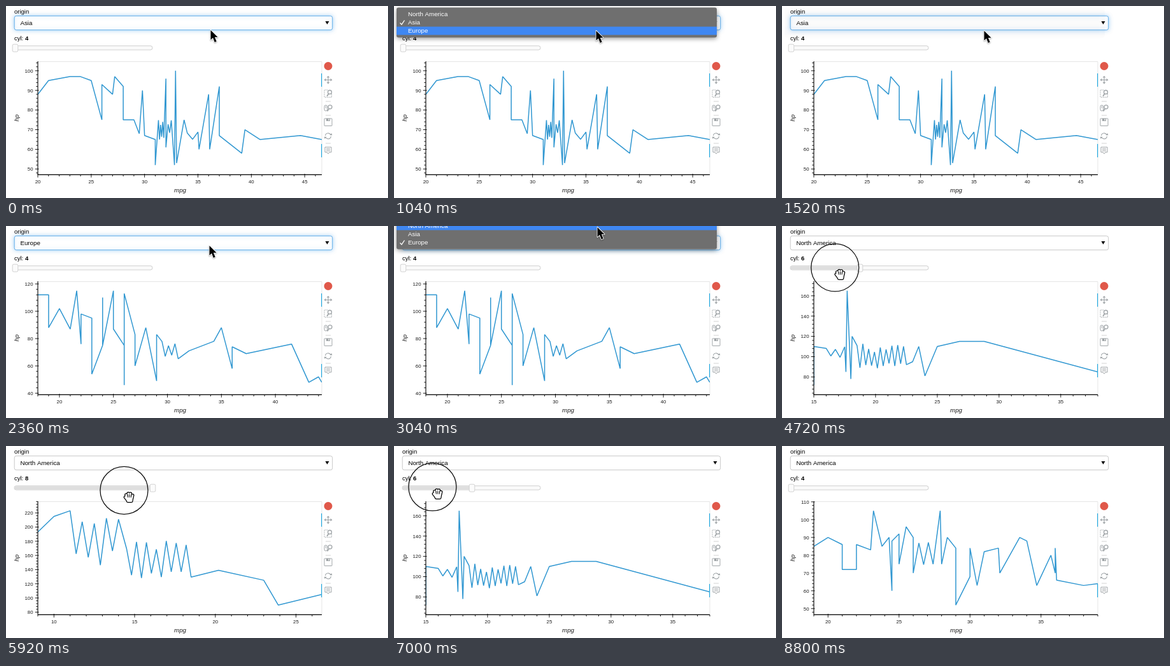
Recreate the animation shown at these times as an HTML page with a canvas. Size 600 by 302 pixels, loop 8.84 s.

```html
<!DOCTYPE html>
<html lang="en">
<head>
<meta charset="utf-8">
<title>Chart with controls</title>
<style>
html, body { margin: 0; width: 100%; height: 100%; overflow: hidden; background: #fff; }
canvas { display: block; width: 600px; height: 302px; }
</style>
</head>
<body>
<canvas id="stage"></canvas>
<script>
const W = 600, H = 302, LOOP = 8840;
const canvas = document.getElementById('stage');
const g = canvas.getContext('2d');
const ratio = window.devicePixelRatio || 1;
canvas.width = W * ratio;
canvas.height = H * ratio;

const FONT = '"Liberation Sans", Arial, sans-serif';
const BLUE = '#3097d1', GREY = '#a1a6a9', INK = '#1c1c1c';
const REGIONS = ['North America', 'Asia', 'Europe'];
const frame = { l: 50, r: 496, t: 87, b: 265 };

const clamp = v => Math.max(0, Math.min(1, v));
const ease = u => u * u * (3 - 2 * u);
const noise = v => Math.abs(Math.sin(v * 127.1) * 43758.5) % 1;

// Points that swing between lo and hi, each falling a little short at random
function zigzag(x0, x1, n, lo, hi) {
  return Array.from({ length: n }, (_, i) => {
    const x = x0 + (x1 - x0) * i / (n - 1);
    const short = noise(x) * 0.3 * (hi - lo);
    return [x, i % 2 ? lo + short : hi - short];
  }).flat();
}

// Each chart: key turns as mpg, hp with the dense stretches generated
const asia = [
  20, 88, 21, 95, 23, 97, 24, 97, 25, 95, 26, 75, 26, 93, 27, 88, 27.2, 97, 28, 92, 28, 75, 29, 75,
  29.5, 68, 29.8, 90, 30, 67, 31, 65, 31, 52, ...zigzag(31.3, 31.8, 6, 65, 75), 32, 96, 32, 61,
  ...zigzag(32.2, 32.5, 3, 67, 75), 32.8, 52, 32.9, 100, 33, 53, 33.7, 75,
  ...zigzag(34, 35, 3, 65, 69), 35.1, 60, 36, 88, 36.1, 60, 37, 92, 37, 67, 39.1, 58, 39.4, 70,
  40.8, 65, 44.6, 67, 46.6, 65];
const europe = [
  18, 112, 19, 112, 19, 88, 20, 102, 21, 87, 21.6, 115, 22, 76, 22, 98, 23, 95, 23, 54, 24, 75,
  24, 110, 24, 75, 25, 115, 25, 87, 26, 75, 26, 46, 26, 113, 27, 83, 27, 60, 28, 88, 29, 49, 29, 83,
  ...zigzag(29.5, 31, 6, 64, 78), 32, 71, 34.3, 78, 35, 88, 36, 58, 36, 74, 37.3, 69, 41.5, 76,
  43.1, 48, 44, 52, 44.3, 48];
const america4 = [
  19, 85, 20, 90, 21, 86, 21, 72, 22, 72, 22, 86, 23, 83, 23.2, 105, 23.8, 85, 24.3, 90, 24.5, 60,
  24.5, 88, 25, 92, 25, 75, 25.5, 96, 26, 90, 26, 70, ...zigzag(26.4, 27.4, 4, 74, 90),
  27.9, 105, 28, 75, 28.4, 90, 29, 84, 29, 52, 30, 68, 30, 84, 30.5, 63, 31, 82, 32, 84, 32.1, 70,
  33.5, 90, 34, 88, 34.7, 63, 35.7, 80, 36, 70, 36, 84, 36.1, 66, 38, 63, 39, 64];
const america6 = [
  15, 72, 15, 110, ...zigzag(16, 17.5, 5, 98, 110), 17.6, 85, 17.7, 165, 18, 78, 18.1, 120,
  ...zigzag(18.5, 22.5, 18, 85, 113), 23, 95, 23.5, 110, 24, 81, 25, 110, 26.8, 115, 28.8, 115, 38, 85];
const america8 = [
  9, 193, 10, 215, ...zigzag(11, 14, 9, 140, 230), ...zigzag(14.5, 18.5, 14, 125, 185),
  20.2, 139, 23, 125, 23.9, 90, 26.6, 105];

// Pointer stops: time, x, y
const path = [
  [0, 322, 37], [350, 321, 30], [700, 320, 30], [1050, 318, 38], [1600, 318, 38],
  [2200, 320, 30], [2500, 320, 30], [2960, 320, 1], [3300, 320, 1], [3800, 16, 65],
  [4050, 16, 65], [5634, 190, 66], [5760, 190, 70], [7250, 50, 64], [LOOP, 50, 64]];
const menus = [
  { open: 420, close: 1250, gone: 1560, pick: 1 },
  { open: 2500, close: 3200, gone: 3500, pick: 2 }];

function pointerAt(t) {
  let i = 0;
  while (i < path.length - 2 && t >= path[i + 1][0]) i++;
  const [t0, x0, y0] = path[i], [t1, x1, y1] = path[i + 1];
  const u = ease(clamp((t - t0) / (t1 - t0)));
  return { x: x0 + (x1 - x0) * u, y: y0 + (y1 - y0) * u };
}

function trace(points) {
  g.beginPath();
  for (let i = 0; i < points.length; i += 2) g.lineTo(points[i], points[i + 1]);
}

function line(points, color, width, close) {
  trace(points);
  if (close) g.closePath();
  g.strokeStyle = color;
  g.lineWidth = width;
  g.stroke();
}

function poly(points, color) {
  trace(points);
  g.fillStyle = color;
  g.fill();
}

function box(x, y, w, h, r, fill, stroke) {
  g.beginPath();
  g.roundRect(x, y, w, h, r);
  if (fill) { g.fillStyle = fill; g.fill(); }
  if (stroke) { g.strokeStyle = stroke; g.lineWidth = 1; g.stroke(); }
}

function text(s, x, y, size, style = '', align = 'left', color = '#000') {
  g.font = `${style} ${size}px ${FONT}`;
  g.textAlign = align;
  g.fillStyle = color;
  g.fillText(s, x, y);
}

function arc(x, y, r, color, width, from = 0, to = 7) {
  g.beginPath();
  g.arc(x, y, r, from, to);
  g.strokeStyle = color;
  g.lineWidth = width;
  g.stroke();
}

function shadow(color, blur, dy = 0) {
  g.shadowColor = color;
  g.shadowBlur = blur * ratio;
  g.shadowOffsetY = dy * ratio;
}

// Runs draw with the origin moved to x, y and turned
function at(x, y, turn, draw) {
  g.save();
  g.translate(x, y);
  g.rotate(turn);
  draw();
  g.restore();
}

function tickStep(span) {
  const miss = s => Math.abs(6 - span / s);
  return [1, 2, 5, 10, 20, 50].reduce((a, b) => miss(b) < miss(a) ? b : a);
}

function eachTick(lo, hi, draw) {
  const minor = tickStep(hi - lo) / 5;
  for (let i = Math.ceil(lo / minor - 1e-6); i * minor <= hi + 1e-6; i++) {
    draw(i * minor, i % 5 === 0);
  }
}

function drawChart(data) {
  const { l, r, t, b } = frame;
  const hp = data.filter((v, i) => i % 2);
  const x0 = data[0], x1 = data[data.length - 2];
  const low = Math.min(...hp), high = Math.max(...hp), pad = (high - low) * 0.1;
  const y0 = low - pad, y1 = high + pad;
  const px = v => l + (v - x0) / (x1 - x0) * (r - l);
  const py = v => b - (v - y0) / (y1 - y0) * (b - t);
  const base = b + .4;

  line([l, t + .5, r, t + .5, r, b], '#e5e5e5', 1);
  g.save();
  g.beginPath();
  g.rect(l, t, r - l, b - t);
  g.clip();
  g.lineJoin = 'bevel';
  line(data.map((v, i) => i % 2 ? py(v) : px(v)), BLUE, 1.5);
  g.restore();

  line([l, t, l, base], '#000', 1.1);
  line([l, base, r, base], '#000', 1.1);
  eachTick(x0, x1, (v, major) => {
    const x = px(v);
    line([x, base - (major ? 1.5 : 0), x, base + (major ? 4.3 : 2.7)], '#000', .9);
    if (major) text(v, x, 278.7, 7.8, '', 'center', INK);
  });
  eachTick(y0, y1, (v, major) => {
    const y = py(v);
    line([l - (major ? 4.3 : 2.7), y, l + (major ? 1.5 : 0), y], '#000', .9);
    if (major) text(v, 42.5, y + 2.8, 7.8, '', 'right', INK);
  });
  text('mpg', 273.5, 293, 9.7, 'italic', 'center', INK);
  at(20, 176, -Math.PI / 2, () => text('hp', 0, 0, 9.7, 'italic', 'center', INK));
}

function drawLens(x, y) {
  arc(x, y, 3, GREY, 1.3);
  line([x - 1.8, y + 2.6, x - 4.4, y + 6.6], GREY, 1.8);
}

function drawTools() {
  const x = 506;
  g.beginPath();
  g.arc(x, 94.5, 6.5, 0, 7);
  g.fillStyle = '#e0584a';
  g.fill();
  for (const y of [106, 217]) {
    g.fillStyle = '#26aae1';
    g.fillRect(495, y, 1.2, 21);
  }
  for (const y of [150, 172, 216]) line([502, y, 510, y], '#d3d3d3', 1);

  // Pan
  for (let i = 0; i < 4; i++) {
    at(x, 116.2, i * Math.PI / 2, () => {
      line([0, 0, 0, -5], GREY, 1.1);
      poly([0, -6.5, 2.4, -3.6, -2.4, -3.6], GREY);
    });
  }

  // Box zoom
  g.setLineDash([1.6, 1.3]);
  line([511.5, 138, 511.5, 143.5, 500, 143.5, 500, 132, 506, 132], GREY, 1);
  g.setLineDash([]);
  drawLens(508.5, 135.5);

  // Wheel zoom
  box(500, 156, 4.6, 9, 2.3, null, GREY);
  line([502.3, 157.5, 502.3, 160.5], GREY, 1);
  drawLens(509, 158.8);

  // Save
  box(500, 177, 12, 11.5, .5, null, GREY);
  g.fillStyle = GREY;
  g.fillRect(503, 177, 6, 4);
  g.fillStyle = '#fff';
  g.fillRect(506.5, 177.6, 1.3, 2.4);

  // Reset
  for (const turn of [0, Math.PI]) {
    at(x, 204.5, turn, () => {
      arc(0, 0, 4.5, GREY, 1.2, Math.PI * 1.05, Math.PI * 1.85);
      poly([2.4, -1.2, 6.4, -1.2, 5.4, -4.6], GREY);
    });
  }

  // Hover
  line([501, 222, 511, 222, 511, 230, 508, 230, 506, 232.5, 504, 230, 501, 230], GREY, 1, true);
  for (let y = 224.3; y < 229; y += 1.9) line([503, y, 509, y], GREY, .8);
}

function drawControls(region, cyl, focused) {
  text('origin', 13, 11.8, 9.5);
  g.save();
  if (focused) shadow('rgba(82,168,236,.5)', 6);
  box(13.2, 15.7, 499.5, 22, 3, '#fff', focused ? '#66afe9' : '#c8c8c8');
  g.restore();
  text(REGIONS[region], 22.4, 29.9, 9.75);
  poly([501.5, 24, 507.5, 24, 504.5, 29], '#000');

  text('cyl: ', 13, 54.3, 9.5);
  text(cyl, 13 + g.measureText('cyl: ').width, 54.3, 9.5, 'bold');

  const thumb = 14.5 + (cyl - 4) * 54;
  box(13, 62.7, 217, 6.3, 3, '#fafafa', '#d0d0d0');
  if (cyl > 4) box(13.5, 63.2, thumb - 13.5, 5.3, 2.5, '#dedede');
  box(thumb - 4.3, 60.2, 8.6, 11.8, 2, '#fbfbfb', '#d2d2d2');
}

function drawMenu(menu, t, pointer) {
  if (t < menu.open || t >= menu.gone) return;
  const rowY = i => 26 + (i - menu.pick) * 13;
  g.save();
  g.globalAlpha = (1 - clamp((t - menu.close) / (menu.gone - menu.close))) ** 2;
  g.save();
  shadow('rgba(0,0,0,.4)', 7, 2);
  box(4, rowY(0) - 10.5, 503, 47, 3, '#6f6f6f');
  g.restore();
  REGIONS.forEach((name, i) => {
    const y = rowY(i);
    if (Math.abs(pointer.y - y) <= 6.5) {
      g.fillStyle = '#3f87f2';
      g.fillRect(4, y - 6.5, 503, 13);
    }
    text(name, 22, y + 3.4, 9.75, '', 'left', '#fff');
    if (i === menu.pick) line([9.5, y + .5, 12, y + 3.2, 16.5, y - 3.5], '#fff', 1.3);
  });
  g.restore();
}

function drawArrow() {
  const shape = [0, 0, 0, 17, 3.9, 13.4, 7, 21, 10.2, 19.6, 7.1, 12.3, 12.3, 12.1];
  g.scale(.9, .9);
  g.lineJoin = 'round';
  shadow('rgba(0,0,0,.35)', 2, 1);
  line(shape, '#fff', 2, true);
  g.shadowColor = 'transparent';
  poly(shape, '#000');
}

function drawHand(closed) {
  const reach = closed ? 5 : 8, spread = closed ? 3.3 : 3.8;
  const fingers = [-1.4, -.4, .6, 1.6].map(k =>
    [k * spread, k * k * 1.2 - reach, k * 2.6, 2]);
  fingers.push([closed ? -6 : -7.2, 1, -2.4, 5.5]);
  const palm = [-3.5, 1, 4.4, 1, 3.4, 7, -2, 7];
  g.lineCap = g.lineJoin = 'round';
  for (const [color, grow] of [['#000', 2.4], ['#fff', 0]]) {
    for (const f of fingers) line(f, color, 3 + grow);
    line(palm, color, 3 + grow, true);
    poly(palm, color);
  }
  for (let k = -1; k <= 1; k++) {
    line([k * 2.8 + .4, closed ? -3 : -2, k * 2.5 + .4, closed ? 1 : 4.5], '#000', 1);
  }
}

function drawPointer(t, p) {
  if (t < 3760) return at(p.x - .5, p.y + 1, 0, drawArrow);
  const held = t >= 4050 && t < 7300;
  g.save();
  g.globalAlpha = 1 - clamp((t - 7550) / 350);
  if (held) arc(p.x, p.y, 37.5, '#111', 1.3);
  at(p.x + 8, p.y + 9.8, 0, () => drawHand(held));
  g.restore();
}

function draw(t) {
  const p = pointerAt(t);
  const region = t < 1640 ? 1 : t < 3540 ? 2 : 0;
  const cyl = t < 4580 ? 4 : t < 5400 ? 6 : t < 6080 ? 8 : t < 7100 ? 6 : 4;
  const america = { 4: america4, 6: america6, 8: america8 };
  const data = t < 1720 ? asia : t < 3600 ? europe : america[cyl];

  g.setTransform(ratio, 0, 0, ratio, 0, 0);
  g.fillStyle = '#fff';
  g.fillRect(0, 0, W, H);
  drawChart(data);
  drawTools();
  drawControls(region, cyl, t < 4050);
  for (const m of menus) drawMenu(m, t, p);
  drawPointer(t, p);
}

const start = performance.now();
function tick() {
  draw((performance.now() - start) % LOOP);
  requestAnimationFrame(tick);
}
tick();
</script>
</body>
</html>
```
